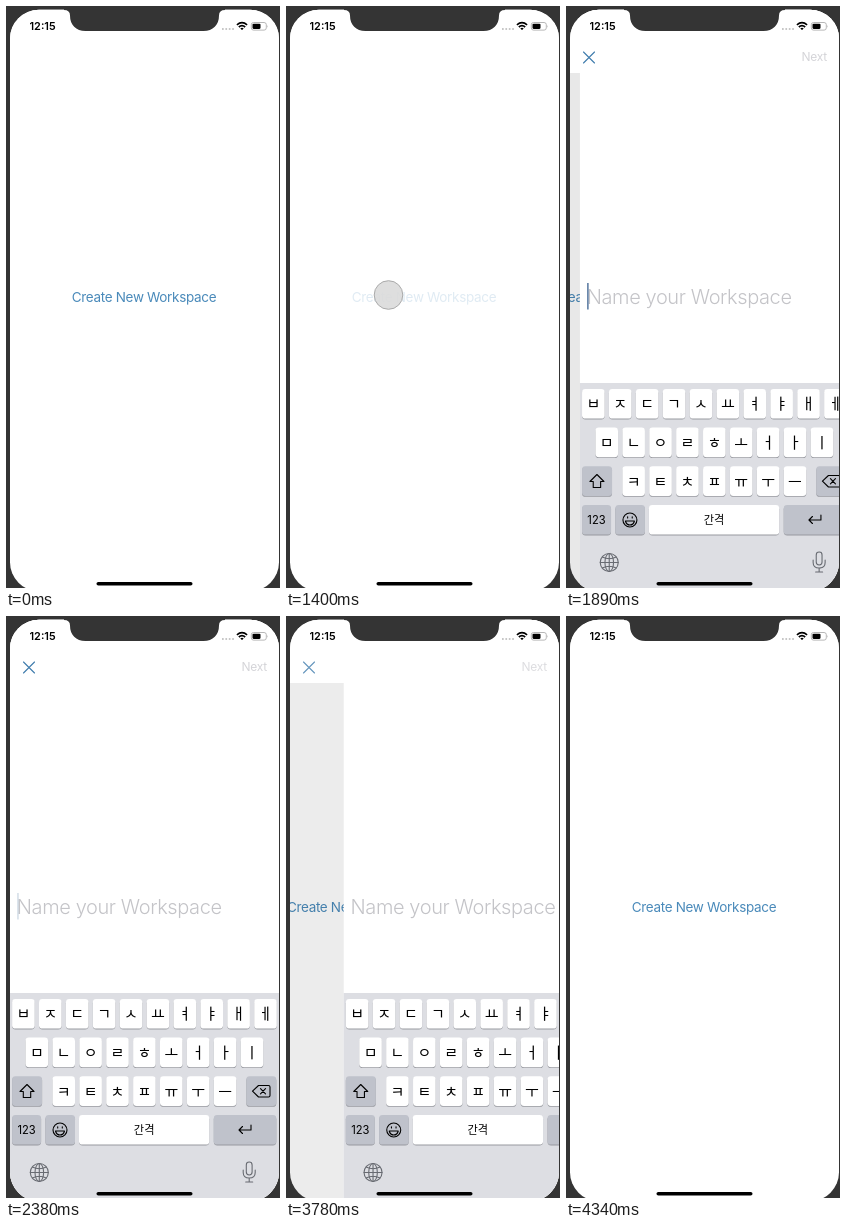
Write an HTML page that moves like this. It is 274 px wide and 582 px high and loops after 5180 ms.

```html
<!DOCTYPE html>
<html lang="en">
<head>
<meta charset="utf-8">
<title>Create workspace</title>
<style>
  html, body { margin: 0; width: 100%; height: 100%; overflow: hidden; background: #343434; }
  svg { display: block; width: 100%; height: 100%; }
  text { font-family: Inter, Roboto, sans-serif; }
  .jamo { font: 15px "Noto Sans CJK KR", "Noto Sans CJK", sans-serif; text-anchor: middle; }
  .line { fill: none; stroke: #000; stroke-width: 1.1; stroke-linecap: round; stroke-linejoin: round; }
  .gray { stroke: #686b72; }
</style>
</head>
<body>
<svg viewBox="0 0 274 582">
  <clipPath id="screenClip"><rect x="4" y="3.7" width="269" height="581.5" rx="29"/></clipPath>
  <g clip-path="url(#screenClip)">
    <rect width="274" height="590" fill="#fff"/>
    <g id="home">
      <text id="create" x="138" y="295.5" text-anchor="middle" font-size="13.5" letter-spacing="-.33" fill="#4a8aba">Create New Workspace</text>
    </g>
    <rect id="dim" width="274" height="590"/>

    <g id="page">
      <rect x="4" width="274" height="590" fill="#fff"/>
      <text x="10.8" y="298.3" font-size="20" font-weight="300" letter-spacing="-.4" fill="#c4c4c8">Name your Workspace</text>
      <rect id="caret" x="11.2" y="277" width="1.5" height="26.5" fill="#56779f"/>
      <rect x="4" y="377" width="274" height="213" fill="#dddee3"/>
      <g id="keys"></g>
      <g class="line">
        <path d="M21 468.5L28 475.5H24.7V481.5H17.3V475.5H14Z"/>
        <path d="M252.5 469.5H262.5Q264 469.5 264 471V479.5Q264 481 262.5 481H252.5L246.5 475.2ZM254.5 472.7L259.5 477.8M259.5 472.7L254.5 477.8"/>
        <circle cx="54" cy="514" r="7"/>
        <path d="M49.5 515H58.5Q57.5 519 54 519T49.5 515ZM51.7 510.8V512M56.3 510.8V512"/>
        <path d="M245 509V514H233M236.5 510.5L233 514L236.5 517.5"/>
      </g>
      <g class="line gray">
        <circle cx="33.3" cy="556.5" r="9"/>
        <ellipse cx="33.3" cy="556.5" rx="4.3" ry="9"/>
        <path d="M33.3 547.5V565.5M24.3 556.5H42.3M26.3 551Q33.3 554.5 40.3 551M26.3 562Q33.3 558.5 40.3 562"/>
        <rect x="240.3" y="546" width="5.8" height="13" rx="2.9"/>
        <path d="M237.2 554V556.5Q237.2 562 243.2 562T249.2 556.5V554M243.2 562V566M239.7 566H246.7"/>
      </g>
    </g>

    <rect width="274" height="67" fill="#fff"/>
    <g id="nav">
      <path id="close" class="line" d="M17.5 46L28.5 57M28.5 46L17.5 57" style="stroke:#3f7cad"/>
      <text x="235.5" y="55.3" font-size="12" letter-spacing="-.25" fill="#d4d4d8">Next</text>
    </g>

    <text x="23.5" y="24.2" font-size="10.9" font-weight="600">12:15</text>
    <path d="M216 23H228" stroke="#b5b5b5" stroke-width="1.6" stroke-dasharray="1.7 1.7"/>
    <g fill="none" stroke="#000" stroke-width="1.7">
      <path d="M230.9 18.8Q236 14.5 241.1 18.8M232.8 21Q236 18.4 239.2 21"/>
      <path d="M234.3 22.3Q236 21 237.7 22.3L236 24.2Z" fill="#000" stroke="none"/>
    </g>
    <rect x="245.3" y="16.5" width="15" height="7.6" rx="2.2" fill="none" stroke="#a5a5a5" stroke-width=".8"/>
    <rect x="246.5" y="17.7" width="8" height="5.2" rx="1.1"/>
    <path d="M261.3 19V21.8Q262.4 20.4 261.3 19Z" fill="#a5a5a5"/>
    <rect x="90.5" y="576" width="96" height="3.6" rx="1.8"/>
    <circle id="touch" r="14.3" fill="#dadada" fill-opacity=".9" stroke="#a3a3a3" stroke-width=".9"/>
  </g>
  <path d="M58 3V4Q64 4 64 9.5C64 19 70 25 79.5 25H197.5C207 25 213 19 213 9.5Q213 4 219 4V3Z" fill="#343434"/>
</svg>

<script>
const LOOP = 5180, STEP = 70;
const el = id => document.getElementById(id);
const show = (id, opacity) => el(id).setAttribute("opacity", opacity);
const move = (id, x, y = 0) => el(id).setAttribute("transform", `translate(${x} ${y})`);
const clamp = v => Math.min(1, Math.max(0, v));

function key(x, y, width, label = "", { dark = false, size = 15 } = {}) {
  const box = (dy, fill) =>
    `<rect x="${x}" y="${y + dy}" width="${width}" height="29.6" rx="3.4" fill="${fill}"/>`;
  const latin = label === "123";
  const style = latin ? "font:11.2px Inter,sans-serif;text-anchor:middle" : `font-size:${size}px`;
  const baseline = y + 14.7 + size * .38;
  return box(.9, "#989aa0") + box(0, dark ? "#bfc2cb" : "#fff") +
    `<text class="jamo" style="${style}" x="${x + width / 2}" y="${baseline}">${label}</text>`;
}

function buildKeyboard() {
  const PITCH = 26.9, WIDTH = 22.6;
  const row = (letters, x, y) =>
    [...letters].map((c, i) => key(x + i * PITCH, y, WIDTH, c)).join("");
  const dark = { dark: true };
  el("keys").innerHTML =
    row("ㅂㅈㄷㄱㅅㅛㅕㅑㅐㅔ", 6.1, 383) +
    row("ㅁㄴㅇㄹㅎㅗㅓㅏㅣ", 19.5, 421.6) +
    row("ㅋㅌㅊㅍㅠㅜㅡ", 46.4, 460.3) +
    key(6.1, 460.3, 30, "", dark) + key(240.3, 460.3, 30, "", dark) +
    key(6.1, 499, 29, "123", { dark: true, size: 11.2 }) + key(39.4, 499, 29.6, "", dark) +
    key(73, 499, 130.3, "간격", { size: 11.2 }) + key(207.8, 499, 62.5, "", dark);
}

// Critically damped spring from 0 to 1; ms since its start.
function spring(ms) {
  const x = Math.max(0, ms) * .01826;
  return 1 - (1 + x) * Math.exp(-x);
}

function caretOpacity(t) {
  if (t < 2500) return clamp((2450 - t) / 280);
  return t < 3000 ? clamp((t - 2660) / 140) : clamp((3430 - t) / 210);
}

function draw(t) {
  const shown = spring(t - 1610) - spring(t - 3735);
  move("home", -81 * shown);
  move("page", 270 * (1 - shown));
  show("dim", .095 * shown);
  show("nav", clamp((shown - .2) / .75));
  show("caret", caretOpacity(t));

  const closing = t >= 3640 && t < 3780;
  show("create", t >= 1400 && t < 1680 ? .17 : 1);
  show("close", closing ? .25 : 1);
  show("touch", closing || (t >= 1400 && t < 1540) ? 1 : 0);
  if (closing) move("touch", 22.5, 54);
  else move("touch", 102.5, 289);
}

function tick() {
  const t = performance.now() % LOOP;
  draw(Math.floor(t / STEP + .001) * STEP);
  requestAnimationFrame(tick);
}

buildKeyboard();
tick();
</script>
</body>
</html>
```
